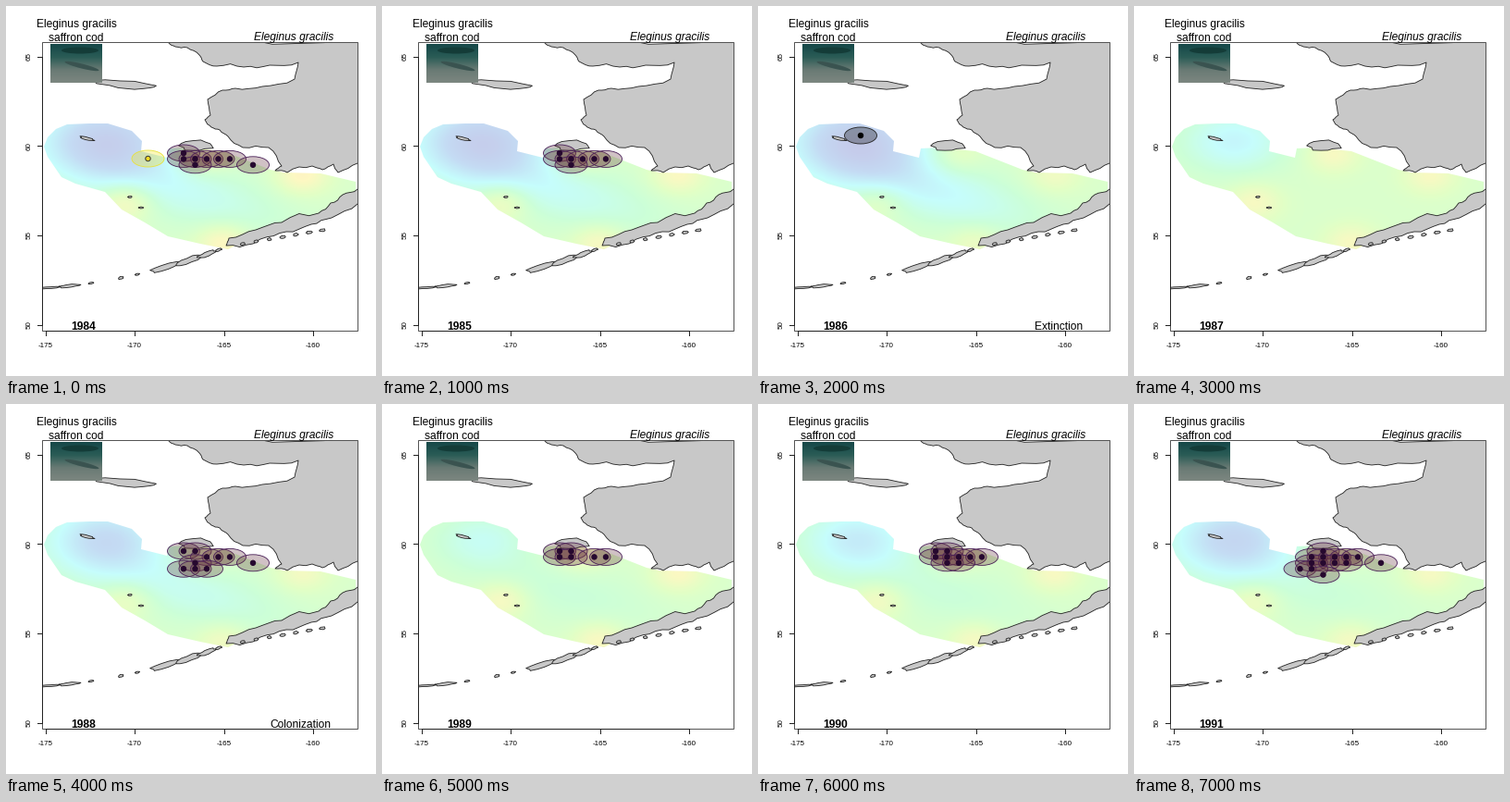
A matplotlib script that plays this animation: 400x400 px, repeating every 8 s.

```python
import numpy as np
import matplotlib.pyplot as plt
from matplotlib.animation import ArtistAnimation
from matplotlib.colors import LinearSegmentedColormap
from matplotlib.patches import Ellipse, Polygon, Rectangle

SIZE, DPI = 400, 100
LEFT, TOP, RIGHT, BOTTOM = 38.5, 38.5, 379.5, 350.5  # edges of the map
PT = 72 / DPI
INK = "#222222"
rng = np.random.default_rng(7)

fig = plt.figure(figsize=(SIZE / DPI, SIZE / DPI), dpi=DPI, facecolor="white")
ax = fig.add_axes([0, 0, 1, 1])
ax.axis("off")
frame = Rectangle((LEFT, TOP), RIGHT - LEFT, BOTTOM - TOP, fill=False,
                  ec="#555555", lw=PT, zorder=5)
ax.add_patch(frame)


def points(text):
    return np.array([p.split(",") for p in text.split()], dtype=float)


def roughen(outline, jitter):
    """Shift the middle of each edge sideways, twice."""
    for _ in range(2):
        edge = np.roll(outline, -1, axis=0) - outline
        normal = np.column_stack([-edge[:, 1], edge[:, 0]])
        shift = rng.uniform(-jitter, jitter, (len(outline), 1))
        middle = outline + edge / 2 + normal * shift
        outline = np.stack([outline, middle], axis=1).reshape(-1, 2)
    return outline


def land(outline):
    shape = Polygon(outline, fc="#c8c8c8", ec=INK, lw=.85 * PT, joinstyle="round", zorder=3)
    ax.add_patch(shape)
    shape.set_clip_path(frame)


def island(x, y, length, width, slope=0.0):
    """An irregular oval lying along the given slope."""
    a = np.linspace(0, 2 * np.pi, 14, endpoint=False)
    r = rng.uniform(.75, 1.15, a.size)
    dx, dy = r * np.cos(a) * length / 2, r * np.sin(a) * width / 2
    land(np.column_stack([x + dx, y + dy + slope * dx]))


def label(x, y, text, px=12, **kw):
    kw = {"ha": "center", "va": "baseline", "zorder": 6, **kw}
    return ax.text(x, y, text, fontsize=px * PT, family="Liberation Sans", **kw)


# Mainland, then the peninsula
land(roughen(points(
    "176,30 176,40 183,44 196,45 209,53 213,60 228,65 257,66 285,64 316,61 312,79 "
    "277,87 248,89 234,91 218,101 221,118 215,123 222,131 231,134 240,141 256,153 "
    "284,153 298,173 291,178 304,180 331,173 342,177 354,171 359,180 380,170 "
    "400,165 400,30"), .1))
land(roughen(points(
    "400,193 380,198 364,204 351,213 338,224 298,234 270,242 241,251 238,259 "
    "267,257 275,252 303,244 330,236 352,229 380,214 400,207"), .12))

# Islands of the shelf
island(206, 151, 36, 11)
island(130, 85, 72, 8, .09)
island(88, 143.5, 16, 3, .25)
island(134, 206.5, 5, 2)
island(146, 218, 5, 2)

# The chain bends upwards to the east
for x, length, width in [(46, 26, 2), (68, 24, 3), (92, 6, 2), (124, 6, 3), (142, 5, 2),
                         (172, 34, 6), (198, 30, 7), (217, 20, 5), (230, 7, 3)]:
    t = x - 40
    island(x, 305 - .062 * t - .00082 * t * t, length, width, -.062 - .00164 * t)
for x in np.linspace(256, 342, 7):
    island(x, 257 - .17 * (x - 256), rng.uniform(4, 8), 3, -.1)

# Underwater picture in its main tones
tones = np.array([[22, 72, 72], [42, 92, 86], [105, 122, 116], [124, 134, 128]]) / 255
rows = np.linspace(0, 3, 42)
photo = np.stack([np.interp(rows, range(4), c) for c in tones.T], axis=-1)[:, None]
ax.imshow(photo, extent=(48, 104, 83, 41), aspect="auto", zorder=6)
ax.add_patch(Ellipse((80, 48), 40, 7, fc="#143c38", zorder=7))
ax.add_patch(Ellipse((82, 65), 38, 5, angle=14, fc="#3a5350", zorder=7))

# Titles and axes
label(76, 23, "Eleginus gracilis")
label(76, 38, "saffron cod")
label(311, 37, "Eleginus gracilis", style="italic")
xs, ys = 42.5 + 96.5 * np.arange(4), 344.5 - 96.6 * np.arange(4)
ax.plot(xs[[0, -1]], [BOTTOM] * 2, color=INK, lw=PT, zorder=6)
ax.plot([LEFT] * 2, ys[[0, -1]], color=INK, lw=PT, zorder=6)
for i, (x, y) in enumerate(zip(xs, ys)):
    ax.plot([x, x], [BOTTOM, BOTTOM + 5], color=INK, lw=PT)
    ax.plot([LEFT - 5, LEFT], [y, y], color=INK, lw=PT)
    label(x, 369, str(-175 + 5 * i), 8)
    label(25, y, str(50 + 5 * i), 8, rotation=90, va="center")

# Temperature surface: a cold pool, a cool tongue and warm shallows
SURVEY = Polygon(points(
    "41,152 45,142 54,133 66,128 90,127 110,127 136,135 147,146 146,157 174,164 "
    "176,154 197,153 235,157 258,166 286,177 300,180 340,181 378,190 378,202 "
    "340,226 283,242 240,263 210,257 175,249 150,234 125,220 107,201 75,192 "
    "60,185 45,163"), transform=ax.transData)
PASTEL = LinearSegmentedColormap.from_list("pastel", [
    (0, "#c6c6e8"), (.2, "#c4dcf4"), (.36, "#c6fdfd"), (.5, "#ccffd8"),
    (.64, "#e2ffc6"), (.8, "#fdf8c2"), (1, "#ffdcc6")])
SHALLOWS = points("130,212 215,160 235,256 320,183")
yy, xx = np.mgrid[0:SIZE, 0:SIZE] + .5


def bump(x, y, length, width, tilt=0.0):
    c, s = np.cos(tilt), np.sin(tilt)
    u, v = c * (xx - x) + s * (yy - y), c * (yy - y) - s * (xx - x)
    return np.exp(-(u / length) ** 2 / 2 - (v / width) ** 2 / 2)


def warmth(pool, tongue, shore):
    reach = 25 + 60 * pool
    field = .59 - pool * bump(108, 146, reach, .6 * reach)
    field -= tongue * bump(200, 203, 75, 24, .25)
    for x, y in SHALLOWS:
        field += shore * bump(x, y, 20, 14)
    return field


# Each year: pool, tongue, shore, then the hit columns of each survey row
YEARS = {
    1984: (.48, .18, .24, "1 12345 27"),
    1985: (.48, .18, .20, "1 12345 2"),
    1986: (.50, .22, .14, ""),
    1987: (.26, .00, .18, ""),
    1988: (.38, .17, .16, "12 345 27 123"),
    1989: (.18, .10, .20, "12 1245"),
    1990: (.30, .10, .18, "12 12345 23"),
    1991: (.42, .09, .17, "2 12345 12347 01 2"),
}
EVENTS = {1986: "Extinction", 1988: "Colonization"}
PURPLE = ((.4, .2, .25, .3), "#4a2058", "#26082f", "#26082f")
BLACK = ((0, 0, 0, .3), INK, "black", "black")
YELLOW = ((.95, .9, .1, .3), "#e8e23c", "#f5d820", "#333333")


def catch(x, y, style):
    fill, rim, dot, dot_rim = style
    halo = Ellipse((x, y), 35, 18, fc=fill, ec=rim, lw=.85 * PT, zorder=4)
    mark = Ellipse((x, y), 5.4, 5.4, fc=dot, ec=dot_rim, lw=PT, zorder=4.5)
    return [ax.add_patch(halo), ax.add_patch(mark)]


def scene(year):
    *climate, hits = YEARS[year]
    surface = ax.imshow(warmth(*climate), cmap=PASTEL, vmin=0, vmax=1, aspect="auto",
                        extent=(0, SIZE, SIZE, 0), zorder=1)
    surface.set_clip_path(SURVEY)
    parts = [surface, label(84, 350, str(year), weight="bold")]
    if year in EVENTS:
        parts.append(label(351.5, 350, EVENTS[year], ha="right"))
    if year == 1984:
        parts += catch(153.5, 165, YELLOW)
    if year == 1986:
        parts += catch(111, 140, BLACK)
    for row, columns in enumerate(hits.split()):
        for column in columns:
            parts += catch(179.5 + 12.5 * int(column), 159 + 6.4 * row, PURPLE)
    return parts


scenes = [scene(year) for year in YEARS]
ax.set_xlim(0, SIZE)
ax.set_ylim(SIZE, 0)

anim = ArtistAnimation(fig, scenes, interval=1000, repeat=True, repeat_delay=0)
plt.show()
```
